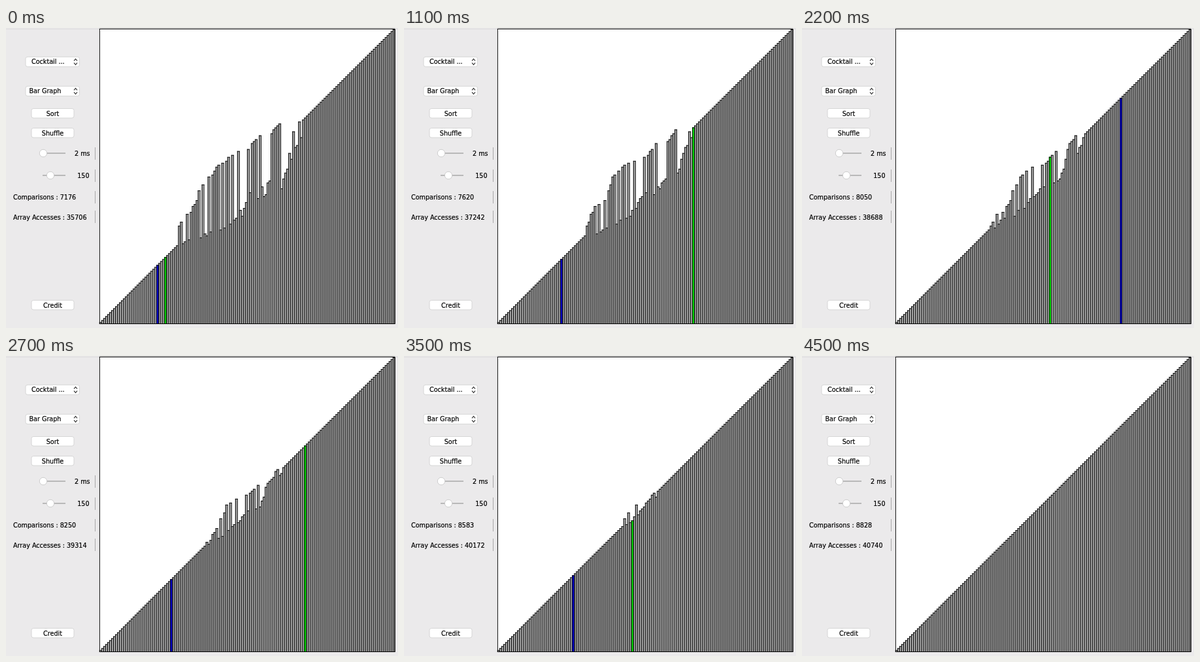
An HTML page with a canvas for the animation above (4.6 s loop, 600x460 px).

```html
<!DOCTYPE html>
<html lang="en">
<head>
<meta charset="utf-8">
<title>Cocktail sort</title>
<style>
  html, body { margin: 0; width: 600px; height: 460px; overflow: hidden; background: #ebeaeb; }
  canvas { display: block; }
</style>
</head>
<body>
<canvas id="stage" width="600" height="460"></canvas>
<script>
const ctx = document.getElementById('stage').getContext('2d');
const LOOP = 4600, TICK = 100;
const FIRST = 7166, LAST = 8829;

// The chart is scaled smoothly, so bars do not fall on whole pixels.
const LEFT = 142.9, BOTTOM = 453.9, PITCH = 452 / 150, LINE = 0.95;

// Values still out of order when the loop begins; the rest are in place.
const unsorted = [
  50, 52, 41, 42, 56, 43, 57, 60, 61, 63, 68, 44, 71, 46, 45, 75, 47, 76, 78, 80, 81,
  48, 82, 49, 83, 85, 51, 86, 53, 54, 88, 58, 55, 59, 62, 89, 67, 92, 93, 94, 64, 96,
  70, 65, 66, 72, 73, 97, 99, 100, 101, 102, 69, 74, 77, 79, 87, 84, 98, 90, 91, 103, 95
];
const start = Array.from({ length: 150 }, (_, i) => unsorted[i - 40] ?? i + 1);

// The bars and the two labels refresh separately, each at its own pace.
const times = [0, 600, 1100, 1700, 2700, 3500, 4120];
const progress = [FIRST, 7409, 7622, 7858, 8257, 8589, LAST];
const comparisons = [7176, 7422, 7620, 7850, 8250, 8583, 8828];
const accesses = [35706, 36610, 37242, 38062, 39314, 40172, 40740];

function countAt(time, counts) {
  const i = times.findIndex(t => t > time);
  if (i < 0) return counts.at(-1);
  const part = (time - times[i - 1]) / (times[i] - times[i - 1]);
  return Math.round(counts[i - 1] + part * (counts[i] - counts[i - 1]));
}

function sortUntil(count) {
  const values = start.slice();
  let lo = 29, hi = 119, step = -1, pos = 33;
  for (let c = FIRST; c < count; c++) {
    const next = pos + step;
    if ((values[next] - values[pos]) * step < 0) {
      [values[pos], values[next]] = [values[next], values[pos]];
    }
    pos = next;
    if (step > 0 && pos === hi) { pos = --hi; step = -1; }
    else if (step < 0 && pos === lo) { pos = ++lo; step = 1; }
  }
  return { values, pos, bound: step > 0 ? hi : lo };
}

function rect(x, y, w, h, color) {
  ctx.fillStyle = color;
  ctx.fillRect(x, y, w, h);
}

function text(label, x, y, align = 'left') {
  ctx.font = '9.6px "DejaVu Sans", sans-serif';
  ctx.textAlign = align;
  ctx.fillStyle = ctx.strokeStyle = '#000';
  ctx.lineWidth = 0.2;
  ctx.fillText(label, x, y);
  ctx.strokeText(label, x, y);
}

function box(x, y, w, h) {
  ctx.beginPath();
  ctx.roundRect(x, y, w, h, 3);
  ctx.fillStyle = '#fff';
  ctx.fill();
  ctx.strokeStyle = '#cfcfcf';
  ctx.lineWidth = 0.8;
  ctx.stroke();
}

function button(label, y) {
  box(39, y, 65, 14.5);
  text(label, 71.5, y + 11, 'center');
}

function dropdown(label, x, y) {
  box(30, y, 82.5, 15);
  text(label, x, y + 11);
  ctx.beginPath();
  for (const dir of [-1, 1]) {
    const base = y + 7.5 + dir * 1.5;
    ctx.moveTo(104, base);
    ctx.lineTo(106.5, base + dir * 3);
    ctx.lineTo(109, base);
  }
  ctx.strokeStyle = '#333';
  ctx.lineWidth = 1.1;
  ctx.stroke();
}

function slider(left, knob, y, label, right) {
  rect(left, y - 1, 91 - left, 2, '#b9b9b9');
  ctx.beginPath();
  ctx.arc(knob, y, 5.7, 0, Math.PI * 2);
  ctx.fillStyle = '#fff';
  ctx.fill();
  ctx.strokeStyle = '#c4c4c4';
  ctx.lineWidth = 0.8;
  ctx.stroke();
  text(label, right, y + 3.5, 'right');
}

function drawPanel(time) {
  rect(0, 0, 600, 460, '#ebeaeb');
  rect(0, 1, 600, 1, '#dadada');
  dropdown('Cocktail ...', 39, 44.3);
  dropdown('Bar Graph', 35.5, 89.3);
  button('Sort', 123.5);
  button('Shuffle', 153.5);
  button('Credit', 417.5);
  slider(52, 57, 192, '2 ms', 128.5);
  slider(56, 68, 226, '150', 127.5);
  text('Comparisons : ' + countAt(time, comparisons), 11, 263);
  text('Array Accesses : ' + countAt(time, accesses), 11, 293.5);
  for (const y of [183, 217, 250, 280]) rect(136, y, 1, 19, '#a8a8a8');
}

function drawBars({ values, pos, bound }, sorting) {
  const right = LEFT + 150 * PITCH;
  rect(LEFT, 1, right - LEFT, 453, '#fff');
  const bar = (i, color) => {
    const x = LEFT + PITCH * i, h = PITCH * values[i], top = BOTTOM - h;
    rect(x, top, PITCH, h, color);
    rect(x, top, PITCH + LINE, LINE, '#000');
    rect(x, top, LINE, h, '#000');
    rect(x + PITCH, top, LINE, h, '#000');
  };
  // Each bar's right edge is shared with its neighbour's left edge.
  values.forEach((_, i) => bar(i, '#a9a9a9'));
  if (sorting) {
    bar(bound, '#0000e0');
    bar(pos, '#00e800');
  }
  rect(LEFT, 1, right - LEFT, 1, '#000');
  rect(LEFT, 453, right - LEFT, 1, '#000');
  rect(LEFT, 1, LINE, 453, '#000');
  rect(right - 0.5, 1, LINE, 453, '#000');
}

let shown = -1;
function frame() {
  const time = Math.floor(performance.now() % LOOP / TICK) * TICK;
  if (time !== shown) {
    shown = time;
    const count = countAt(time, progress);
    drawPanel(time);
    drawBars(sortUntil(count), count < LAST);
  }
  requestAnimationFrame(frame);
}
frame();
</script>
</body>
</html>
```
